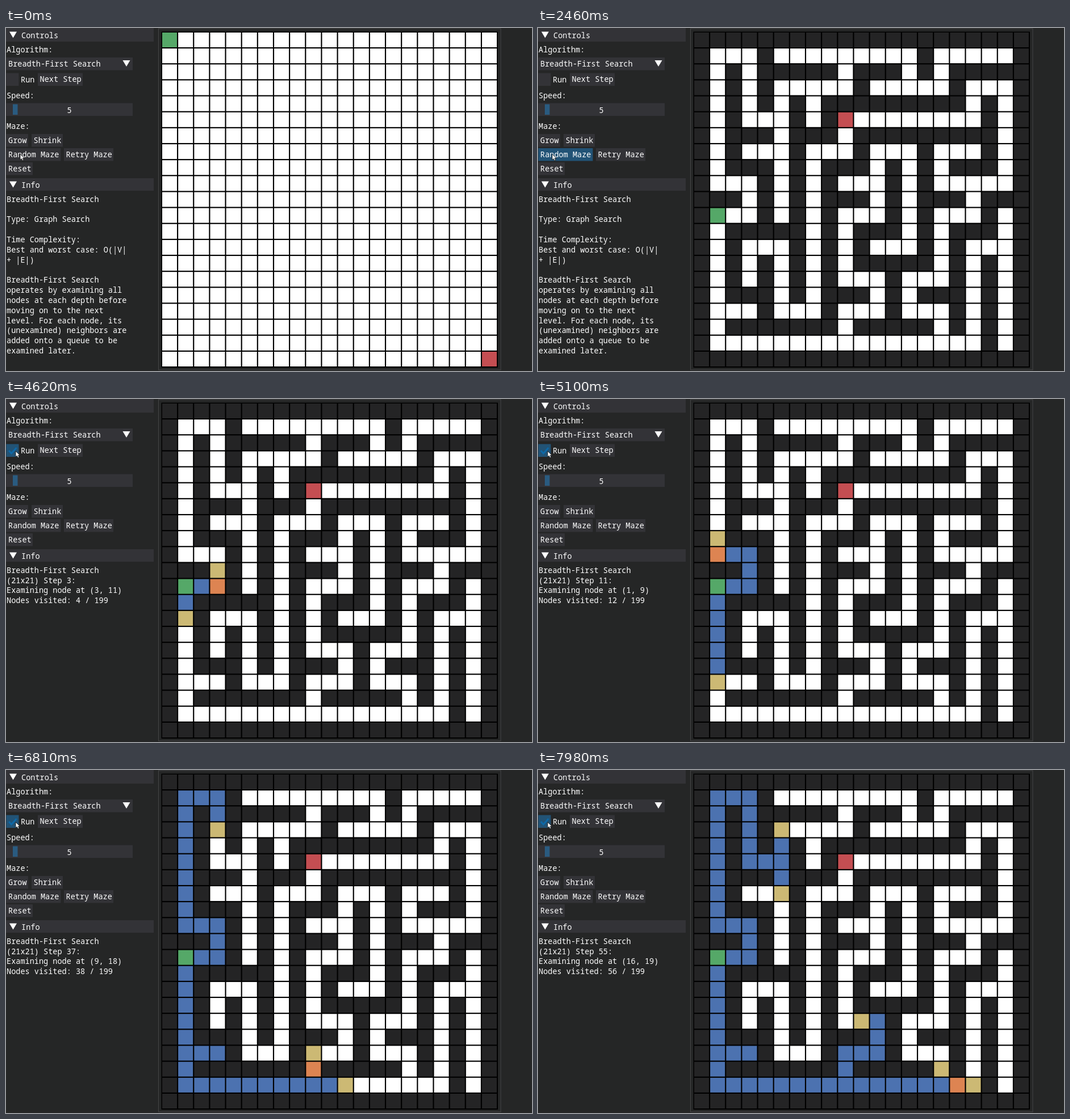
An HTML page that plays this animation: 926x605 px, repeating every 8 s.

```html
<!DOCTYPE html>
<html lang="en">
<head>
<meta charset="utf-8">
<title>Maze search</title>
<style>
  html, body { margin: 0; width: 100%; height: 100%; overflow: hidden; background: #252626; }
  svg { display: block; width: 926px; height: 605px; }
  text { font: 13.55px "Noto Sans Mono", "DejaVu Sans Mono", monospace; fill: #fff; white-space: pre; }
</style>
</head>
<body>
<svg id="stage" viewBox="0 0 926 605"></svg>
<script>
const LOOP = 8000, PRESS = 500, MAZE = 670, MOVE = 2460, ARRIVE = 3810, CLICK = 4270, CHECK = 4330;
const N = 21, PITCH = 28.15, LINE = 17.82;
const FRAME = '#333337', HOVER = '#225376', ACTIVE = '#0f5687';
const WHITE = '#fff', WALL = '#242425', GREEN = '#55a868', RED = '#c44e52',
      BLUE = '#4c72b0', ORANGE = '#dd8452', YELLOW = '#ccb974';

const maze = `
#####################
#...#.........#.....#
#.#.#####.###.#.#####
#.#.#.....#.....#...#
#.#.#.#.#########.#.#
#.#...#.#.........#.#
#.###.###.#########.#
#.#...#...#...#...#.#
#.###.#.###.#.#.###.#
#...#.#.#...#.#.....#
###.#.#.###.#.###.###
#...#.#.#...#.#...#.#
#.#####.#.###.#.###.#
#.#...#.#.#...#.#...#
#.#.#.#.#.#####.#.#.#
#.#.#.#.#...#...#.#.#
#.###.#.###.#.###.#.#
#...#...#...#...#.#.#
#.#######.#####.#.#.#
#.................#.#
#####################`.trim().split('\n');
const start = { x: 1, y: 11 }, goal = { x: 9, y: 5 };

// [step, time] pairs; steps run evenly in between
const pace = [[0, 4380], [11, 5100], [22, 5840], [24, 5980], [35, 6700],
              [36, 6730], [37, 6810], [48, 7540], [55, 7980]];

const intro = `Breadth-First Search

Type: Graph Search

Time Complexity:
Best and worst case: O(|V|
+ |E|)

Breadth-First Search
operates by examining all
nodes at each depth before
moving on to the next
level. For each node, its
(unexamined) neighbors are
added onto a queue to be
examined later.`.split('\n');

const stage = document.getElementById('stage');

function add(tag, attrs) {
  const el = document.createElementNS('http://www.w3.org/2000/svg', tag);
  for (const k in attrs) el.setAttribute(k, attrs[k]);
  return stage.appendChild(el);
}
const rect = (x, y, width, height, fill) => add('rect', { x, y, width, height, fill });
const path = (d, fill, more) => add('path', { d, fill, ...more });
function label(x, mid, str) {
  const el = add('text', { x, y: mid + 4.7 });
  el.textContent = str;
  return el;
}
function set(el, key, value) {
  if (el.getAttribute(key) !== value) el.setAttribute(key, value);
}
function write(el, str) {
  if (el.textContent !== str) el.textContent = str;
}

// Widgets that light up under the cursor; hitW may reach past the drawn box
const widgets = [];
function widget(x, y, w, h, hitW = w) {
  const item = { el: rect(x, y, w, h, FRAME), x, y, w: hitW, h };
  widgets.push(item);
  return item;
}
function button(x, y, w, str) {
  const item = widget(x, y, w, 22.5);
  label(x + 3.5, y + 11, str);
  return item;
}
function header(y, h, str) {
  rect(0, y, 260, h, FRAME);
  const mid = y + h / 2;
  path(`M6 ${mid - 5.5}h13l-6.5 11z`, WHITE);
  label(27, mid + 0.8, str);
}

header(0, 24, 'Controls');
label(1, 38, 'Algorithm:');
widget(0.5, 52, 222.5, 22.5);
label(4, 63, 'Breadth-First Search');
path('M205.5 57h13l-6.5 11z', WHITE);
const check = widget(0.5, 79.5, 22, 22.5, 50);
const tick = path('M5 91l4.5 5l9 -10', 'none', { stroke: '#0e69a7', 'stroke-width': 3 });
label(26, 91, 'Run');
button(56, 79.5, 79, 'Next Step');
label(1, 119, 'Speed:');
widget(0.5, 132.5, 222.5, 22.5);
rect(12, 134.5, 8.5, 18.5, '#2a5b80');
label(107.5, 145, '5');
label(1, 173, 'Maze:');
button(0.5, 187, 38.5, 'Grow');
button(45, 187, 55, 'Shrink');
const random = button(0.5, 212, 96, 'Random Maze');
button(102, 212, 87, 'Retry Maze');
button(0.5, 237, 46.5, 'Reset');
header(265, 22, 'Info');
const info = intro.map((_, i) => label(1, 302 + i * LINE, ''));

add('rect', { x: 268.5, y: 1, width: 602.5, height: 602, fill: 'none', stroke: '#454546' });
rect(273.5, 6.5, 592.5, 592.5, '#000');
const cells = [];
for (let y = 0; y < N; y++)
  for (let x = 0; x < N; x++)
    cells.push(rect(275 + x * PITCH, 8 + y * PITCH, 26, 26, WHITE));

const cursor = path('M0 0V10L2.4 8L4 11.6L6 10.8L4.4 7.3H7.5Z', WHITE,
  { stroke: '#111', 'stroke-width': 0.8 });

// Breadth-first order; found = step in which a node joined the queue
const id = (x, y) => y * N + x;
const queue = [{ ...start, found: 0 }], seen = new Set([id(start.x, start.y)]);
for (let i = 0; i < queue.length; i++) {
  for (const [dx, dy] of [[1, 0], [0, 1], [-1, 0], [0, -1]]) {
    const x = queue[i].x + dx, y = queue[i].y + dy;
    if (maze[y][x] === '#' || seen.has(id(x, y))) continue;
    seen.add(id(x, y));
    queue.push({ x, y, found: i });
  }
}

function stepAt(t) {
  if (t < pace[0][1]) return -1;
  for (let i = 1; i < pace.length; i++) {
    const [s0, t0] = pace[i - 1], [s1, t1] = pace[i];
    if (t < t1) return Math.floor(s0 + (s1 - s0) * (t - t0) / (t1 - t0) + 1e-6);
  }
  return pace[pace.length - 1][0];
}

function cursorAt(t) {
  const ticks = Math.floor((Math.min(t, ARRIVE) - MOVE) / 30);
  const u = Math.max(0, ticks * 30 / (ARRIVE - MOVE)), v = 1 - u;
  const bez = (a, b, c, d) => v * v * v * a + 3 * v * v * u * b + 3 * v * u * u * c + u * u * u * d;
  return { x: bez(25, 30, 41, 17), y: bez(222.5, 151, 92, 92) };
}

function colours(t, step) {
  const fill = Array(N * N).fill(WHITE);
  if (t < MAZE) {
    fill[0] = GREEN;
    fill[N * N - 1] = RED;
    return fill;
  }
  maze.forEach((row, y) => [...row].forEach((c, x) => { if (c === '#') fill[id(x, y)] = WALL; }));
  if (step >= 0) queue.forEach((n, i) => {
    if (n.found <= step) fill[id(n.x, n.y)] = i < step ? BLUE : i === step ? ORANGE : YELLOW;
  });
  fill[id(start.x, start.y)] = GREEN;
  fill[id(goal.x, goal.y)] = RED;
  return fill;
}

function report(step) {
  if (step < 0) return intro;
  const n = queue[step];
  return [intro[0], `(${N}x${N}) Step ${step}:`, `Examining node at (${n.x}, ${n.y})`,
    `Nodes visited: ${step + 1} / ${queue.length}`];
}

let shown;
function draw(t) {
  const step = stepAt(t), p = cursorAt(t);
  set(cursor, 'transform', `translate(${p.x.toFixed(2)} ${p.y.toFixed(2)})`);
  for (const w of widgets) {
    const over = t >= PRESS && p.x >= w.x && p.x < w.x + w.w && p.y >= w.y && p.y < w.y + w.h;
    const held = w === random && t < MAZE || w === check && t >= CLICK && t < CHECK;
    set(w.el, 'fill', !over ? FRAME : held ? ACTIVE : HOVER);
  }
  set(tick, 'visibility', t >= CHECK ? 'visible' : 'hidden');

  const key = `${t < MAZE} ${step}`;
  if (key === shown) return;
  shown = key;
  colours(t, step).forEach((c, i) => set(cells[i], 'fill', c));
  const lines = report(step);
  info.forEach((el, i) => write(el, lines[i] || ''));
}

function loop() {
  draw(performance.now() % LOOP);
  requestAnimationFrame(loop);
}
loop();
</script>
</body>
</html>
```
